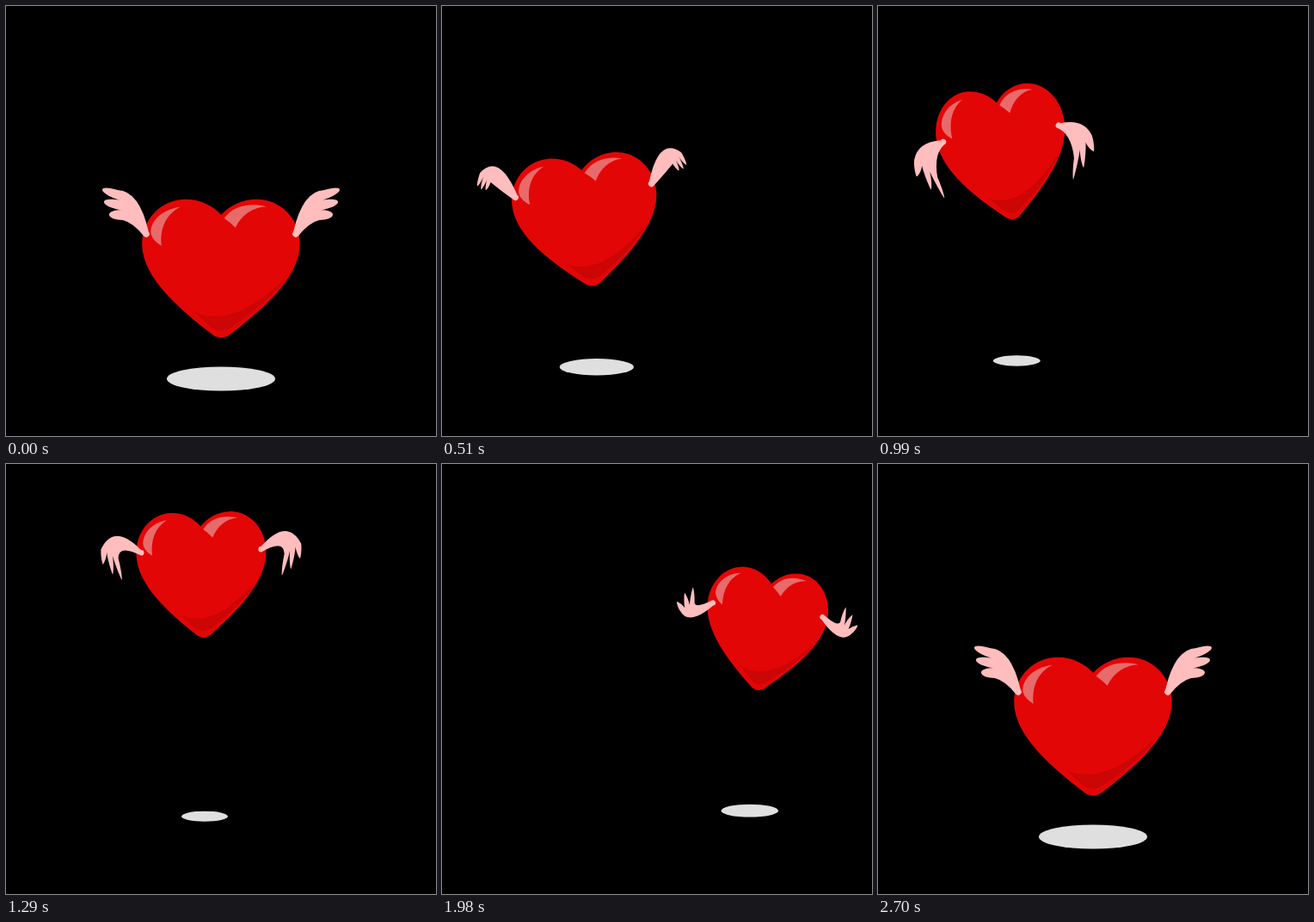
Recreate the animation shown at these times as an HTML page with a canvas. Size 500 by 500 pixels, loop 2.73 s.

```html
<!DOCTYPE html>
<html lang="en">
<head>
<meta charset="utf-8">
<title>Flying heart</title>
<style>
html, body { margin: 0; width: 100%; height: 100%; overflow: hidden; background: #000; }
canvas { display: block; width: 500px; height: 500px; }
</style>
</head>
<body>
<canvas id="stage" width="500" height="500"></canvas>
<script>
const ctx = document.getElementById('stage').getContext('2d');
const LOOP = 2730, STEP = 30, FLIGHT = 2700, FLAP = 270;
const { sin, cos, PI } = Math;

// Height of the heart at a few moments of the flight
const climb = [[0, 314], [510, 258], [990, 180], [1350, 132], [1560, 144], [1980, 201], [2250, 268]];

// Left wing, from its joint: time, outer elbow, first knuckle, first tip, last tip, last knuckle, inner elbow
const flap = [
  [0, -8, -50, -33, -51, -51, -51, -43, -22, -27, -16, -15, -13],
  [90, -24, 12, -26, 3, -31, -18, -51, 5, -45, 17, -30, 38],
  [180, -33, -5, -41, 18, -41, 40, -9, 73, -14, 45, -15, 12],
  [210, -36, -42, -54, -6, -52, 14, -27, 36, -31, 7, -31, -13],
  [240, -15, -58, -41, -35, -46, -19, -36, -13, -29, -22, -16, -9]
];

const heart = new Path2D('M250.5 243C240 232 226 225 209.5 225C181 225 158.5 248 158.5 277C158.5 317 205 355 240 382C246 387 255 387 261 382C296 355 342 317 342 277C342 248 320 225 291.5 225C275 225 261 232 250.5 243Z');
const shade = new Path2D('M219 356C245 368 280 362 328 314C312 338 285 358 262 374Q250 382 238 373Z');
const shine = new Path2D('M203 234C182 236 166 252 169 266Q172 274 181 279C179 258 187 242 203 234ZM254 247C265 232 284 229 303 233.5C288 234 274 243 267 258Q260 251 254 247Z');

const mix = ([ax, ay], [bx, by], k) => [ax + (bx - ax) * k, ay + (by - ay) * k];
const add = ([ax, ay], [bx, by], k = 1) => [ax + bx * k, ay + by * k];
const sub = (a, b) => add(a, b, -1);

// Smooth periodic curve through keys of the form [time, ...values]
function spline(keys, period, t) {
  const n = keys.length;
  const i = keys.findLastIndex(key => key[0] <= t);
  const near = [-1, 0, 1, 2].map(d => keys[(i + d + n) % n]);
  const [t0, t1, t2, t3] = near.map((key, d) => key[0] + Math.floor((i + d - 1) / n) * period);
  const span = t2 - t1, u = (t - t1) / span, v = 1 - u;
  return near[1].slice(1).map((_, c) => {
    const [a, b, d, e] = near.map(key => key[c + 1]);
    const m1 = (d - a) / (t2 - t0) * span, m2 = (e - b) / (t3 - t1) * span;
    return b * (1 + 2 * u) * v * v + m1 * u * v * v + d * u * u * (3 - 2 * u) - m2 * u * u * v;
  });
}

function wingPath(phase) {
  const v = spline(flap, FLAP, phase);
  const [elbow, first, tipA, tipC, last, inner] = [0, 2, 4, 6, 8, 10].map(i => [v[i], v[i + 1]]);
  const palm = mix(first, last, 0.5);
  const tipB = add(palm, sub(mix(tipA, tipC, 0.5), palm), 0);
  const reach = sub(mix(tipA, tipC, 0.5), palm);
  const middle = add(tipB, reach, 1.12);
  const blunt = 0.15 + 0.5 * Math.max(0, cos(phase / FLAP * 2 * PI)) ** 4;
  const angle = Math.atan2(palm[1], palm[0]);
  const joint = 3.8;

  const path = new Path2D();
  path.moveTo(joint * cos(angle + PI / 2), joint * sin(angle + PI / 2));
  path.quadraticCurveTo(...elbow, ...first);
  [tipA, middle, tipC].forEach((tip, i) => {
    const a = mix(first, last, i / 3), b = mix(first, last, (i + 1) / 3);
    const root = mix(a, b, 0.5), axis = sub(tip, root);
    path.bezierCurveTo(...add(a, axis, 0.5), ...add(tip, sub(a, root), blunt), ...tip);
    path.bezierCurveTo(...add(tip, sub(b, root), blunt), ...add(b, axis, 0.5), ...b);
  });
  path.quadraticCurveTo(...inner, joint * cos(angle - PI / 2), joint * sin(angle - PI / 2));
  path.arc(0, 0, joint, angle - PI / 2, angle + PI / 2, true);
  path.closePath();
  return path;
}

function fill(path, color) {
  ctx.fillStyle = color;
  ctx.fill(path);
}

function draw(now) {
  const t = Math.floor((now % LOOP) / STEP) * STEP % FLIGHT;
  const turn = t / FLIGHT * 2 * PI;
  const s1 = sin(turn), c1 = cos(turn), s2 = sin(2 * turn), c2 = cos(2 * turn);

  const x = 254 - 4 * c2 - 112.5 * s1 + 23.5 * s2;
  const [y] = spline(climb, FLIGHT, t);
  const tilt = -0.25 + 0.25 * c2 - 7.5 * s1 + 2.3 * s2;
  const size = 0.8975 + 0.0725 * c1 + 0.03 * c2 + 0.04 * s1 - 0.012 * s2;

  const phase = t % FLAP;
  const pull = sin(PI * (phase / FLAP) ** 1.1) ** 2;
  const stretch = Math.sqrt(1 + 0.21 * pull);

  ctx.fillStyle = '#000';
  ctx.fillRect(0, 0, 500, 500);

  const radius = 40 + 18 * c1 + 5 * c2;
  const ground = 415.5 + 12.5 * c1 + 5.5 * c2 + 5.3 * s1 - 2 * s2;
  const shadow = new Path2D();
  shadow.ellipse(250 + (x - 250) * 0.865, ground, radius, radius * 0.224, 0, 0, 2 * PI);
  fill(shadow, '#dfdfdf');

  ctx.save();
  ctx.translate(x, y);
  ctx.rotate(tilt * PI / 180);
  ctx.scale(size, size);

  ctx.save();
  ctx.scale(1 / stretch, stretch);
  ctx.translate(-250.3, -314.3);
  fill(heart, '#e30606');
  fill(shade, '#cc0505');
  fill(shine, '#e96a6a');
  ctx.restore();

  const wing = wingPath(phase);
  for (const side of [1, -1]) {
    ctx.save();
    ctx.scale(side, 1);
    ctx.translate(-87 + 13 * pull, -49 + 16 * pull);
    fill(wing, '#ffbdbd');
    ctx.restore();
  }
  ctx.restore();
}

let start;
function tick(now) {
  start ??= now;
  draw(Math.max(0, now - start));
  requestAnimationFrame(tick);
}
draw(0);
requestAnimationFrame(tick);
</script>
</body>
</html>
```
